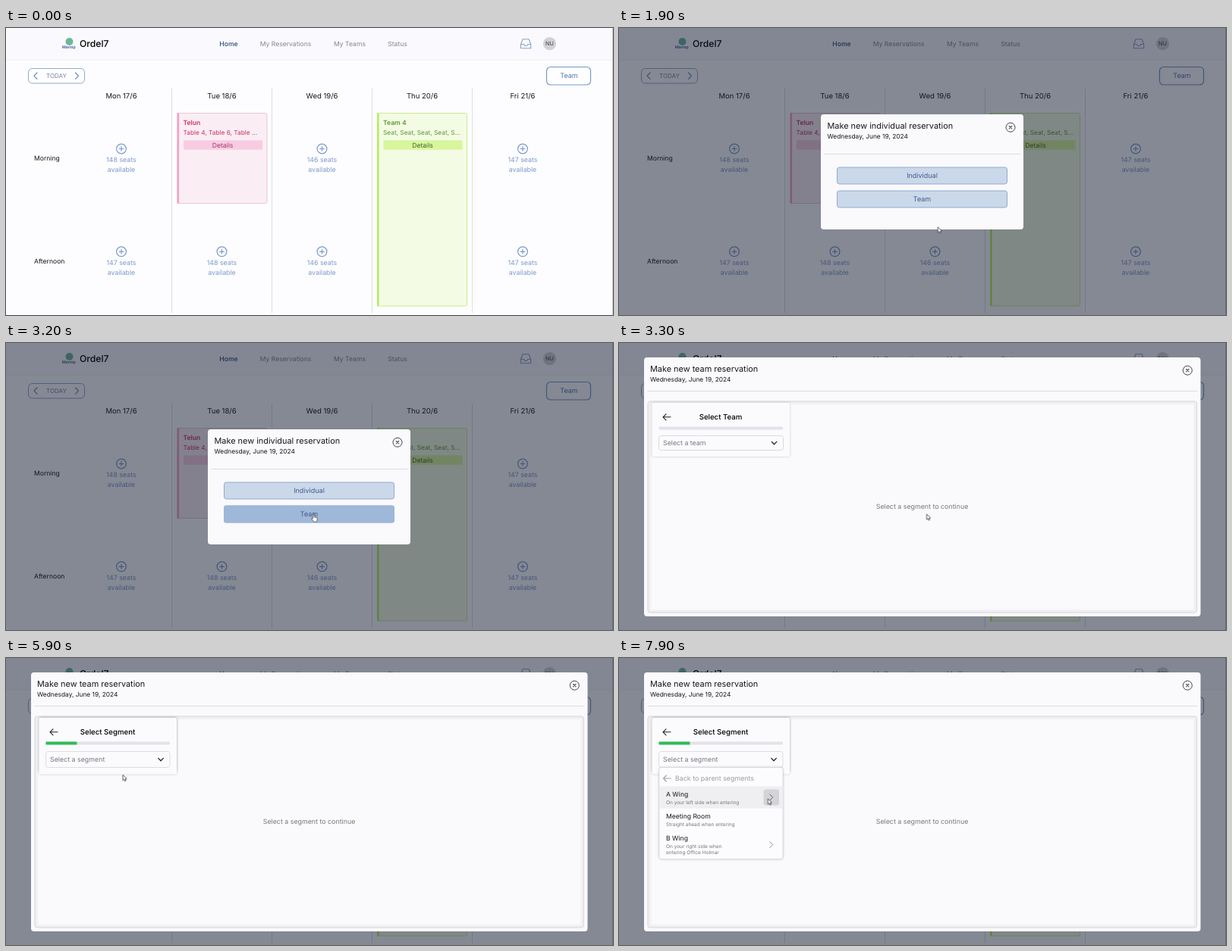
Animation, 800 px wide and 379 px high, one loop 8000 ms. Source, as an HTML page:

```html
<!DOCTYPE html>
<html lang="en">
<head>
<meta charset="utf-8">
<title>Seat reservations</title>
<style>
html, body { margin: 0; width: 100%; height: 100%; overflow: hidden; background: #fdfdff; }
svg { display: block; width: 800px; height: 379px; }
text { font: 8.6px Inter, "Open Sans", sans-serif; fill: #17171c; text-rendering: geometricPrecision; }
.mid { text-anchor: middle; }
.line { fill: none; stroke-linecap: round; stroke-linejoin: round; }
.nav { fill: #85868d; }
.nav.on { fill: #2f4a80; font-weight: 500; }
.brand { font-size: 12.2px; font-weight: 500; fill: #000; }
.day { font-size: 9.5px; }
.slot text { font-size: 8.8px; fill: #7d9acb; }
.slot .line { stroke: #7d9acb; }
.slot.over text { fill: #5f80ba; }
.slot.over .line { stroke: #3d5f9c; }
.title { font-size: 10.9px; }
.date { font-size: 8.35px; }
.btn { font-size: 9px; fill: #3c5a91; }
.step { font-size: 9.65px; font-weight: 500; fill: #000; }
.hint { font-size: 8.85px; fill: #77787f; }
.small { font-size: 6.5px; fill: #77787f; }
.soft { filter: drop-shadow(0 0 1.5px #0003); }

.a { animation: 8s linear infinite; }
.cell-over { animation-name: cell-over; }
.dim { animation-name: dim; }
.choice { animation-name: choice; }
.team-over { animation-name: team-over; }
.booking { animation-name: booking; }
.idle { animation-name: idle; }
.focus { animation-name: focus; }
.float { animation-name: float; }
.teams { animation-name: teams; }
.team-row { animation-name: team-row; }
.segment { animation-name: segment; }
.bar { animation-name: bar; transform-origin: 52.5px 0; }
.parents { animation-name: parents; }
.children { animation-name: children; }
.wing { animation-name: wing; }
.cursor { animation-name: move; animation-timing-function: ease-in-out; }
.hand { animation-name: hand; }
.arrow { animation-name: arrow; }

@keyframes cell-over { 0%, 6% { opacity: 0 } 8%, 23.12% { opacity: 1 } 23.13%, to { opacity: 0 } }
@keyframes dim { 0%, 23.12% { opacity: 0 } 23.13%, to { opacity: 1 } }
@keyframes choice { 0%, 23.12% { opacity: 0 } 23.13%, 40.62% { opacity: 1 } 40.63%, to { opacity: 0 } }
@keyframes team-over { 0%, 34% { opacity: 0 } 35.5%, to { opacity: 1 } }
@keyframes booking { 0%, 40.62% { opacity: 0 } 40.63%, to { opacity: 1 } }
@keyframes idle { 0%, 53.4% { opacity: 1 } 53.41%, to { opacity: 0 } }
@keyframes focus { 0%, 53.4% { opacity: 0 } 53.41%, to { opacity: 1 } }
@keyframes float {
  0%, 53.4% { transform: translate(58px, 135px) scale(1.24); fill: #77787f }
  54.7%, to { transform: translate(58px, 125px); fill: #4a6aa8 }
}
@keyframes teams { 0%, 55.6% { opacity: 0 } 56.8%, 70.62% { opacity: 1 } 70.63%, to { opacity: 0 } }
@keyframes team-row { 0%, 62% { opacity: 0 } 62.5%, to { opacity: 1 } }
@keyframes segment { 0%, 70.62% { opacity: 0 } 70.63%, to { opacity: 1 } }
@keyframes bar { 0%, 70.6% { transform: scaleX(0) } 73.4%, to { transform: none } }
@keyframes parents { 0%, 83% { opacity: 0 } 84%, 93.12% { opacity: 1 } 93.13%, to { opacity: 0 } }
@keyframes children { 0%, 93.12% { opacity: 0 } 93.13%, to { opacity: 1 } }
@keyframes wing { 0%, 95.6% { opacity: 0 } 96.5%, to { opacity: 1 } }
@keyframes move {
  0%, 5.5% { transform: translate(452px, 254px); opacity: 0 }
  5.6% { transform: translate(452px, 254px); opacity: 1 }
  11.2%, 30% { transform: translate(420.2px, 262.8px) }
  37.5%, 44% { transform: translate(405.5px, 225.8px) }
  53%, 57% { transform: translate(194.8px, 130.8px) }
  63%, 66% { transform: translate(157px, 157px) }
  68%, 77% { transform: translate(154px, 154.3px) }
  82%, 84.5% { transform: translate(185px, 131px) }
  90%, 93.5% { transform: translate(199px, 157px) }
  97.5%, to { transform: translate(196.3px, 185.8px); opacity: 1 }
}
@keyframes hand {
  0%, 23.12% { opacity: 1 } 23.13%, 34% { opacity: 0 }
  34.01%, 40.62% { opacity: 1 } 40.63%, 51% { opacity: 0 }
  51.01%, 70.62% { opacity: 1 } 70.63%, 80.5% { opacity: 0 }
  80.51%, 93.12% { opacity: 1 } 93.13%, to { opacity: 0 }
}
@keyframes arrow {
  0%, 23.12% { opacity: 0 } 23.13%, 34% { opacity: 1 }
  34.01%, 40.62% { opacity: 0 } 40.63%, 51% { opacity: 1 }
  51.01%, 70.62% { opacity: 0 } 70.63%, 80.5% { opacity: 1 }
  80.51%, 93.12% { opacity: 0 } 93.13%, to { opacity: 1 }
}
</style>
</head>
<body>
<svg id="stage" viewBox="0 0 800 379"></svg>
<script>
const text = (x, y, s, cls = '', style = '') =>
  `<text x="${x}" y="${y}" class="${cls}" style="${style}">${s}</text>`;
const mid = (x, y, s, cls = '', style = '') => text(x, y, s, 'mid ' + cls, style);
const box = (x, y, w, h, fill, r = 0, stroke = 'none', sw = 1, cls = '') =>
  `<rect x="${x}" y="${y}" width="${w}" height="${h}" rx="${r}" fill="${fill}" stroke="${stroke}" stroke-width="${sw}" class="${cls}"/>`;
const line = (d, color, w = 1) =>
  `<path d="${d}" class="line" stroke="${color}" stroke-width="${w}"/>`;
const anim = (name, ...parts) => `<g class="a ${name}">${parts.join('')}</g>`;
const back = (x, y, color) => line(`M${x + 10} ${y}H${x}m4-4l-4 4 4 4`, color, 1.1);
const right = (x, y, color) => line(`M${x - 2} ${y - 4}l4 4-4 4`, color);
const down = (x, y) => line(`M${x - 3.3} ${y - 1.6}l3.3 3.3 3.3-3.3`, '#222', 1.3);
const close = (x, y) => `<circle cx="${x}" cy="${y}" r="6" fill="none" stroke="#45464d"/>` +
  line(`M${x - 1.7} ${y - 1.7}l3.4 3.4m0-3.4l-3.4 3.4`, '#45464d', 1.1);

const slot = (x, y, seats, cls = '') => `<g class="slot ${cls}">
  <circle cx="${x}" cy="${y}" r="6.4" class="line" stroke-width="1.2"/>
  <path d="M${x - 2.8} ${y}h5.6m-2.8-2.8v5.6" class="line" stroke-width="1.2"/>
  ${mid(x, y + 17.6, seats + ' seats')}${mid(x, y + 30.2, 'available')}</g>`;

const card = (x, h, c, name, places) =>
  box(x + .5, 112.5, 118, h, c.fill, 2, c.edge) +
  box(x, 112, 2.6, h + 1, c.bar, 1) +
  text(x + 8, 128.3, name, '', `font-weight:600;fill:${c.text}`) +
  text(x + 8, 141, places, '', `font-size:8.3px;fill:${c.text}`) +
  box(x + 8.5, 148.3, 104, 12.4, c.chip) +
  mid(x + 60, 157.6, 'Details', '', `fill:${c.label}`);

const pink = { fill: '#faeef4', edge: '#ecc6cf', bar: '#f2a3c6', text: '#d02f68', chip: '#f7cce2', label: '#a63468' };
const green = { fill: '#f4fbe4', edge: '#c9ec92', bar: '#b4f05c', text: '#5a9a30', chip: '#d8f69b', label: '#44662a' };

const header = box(0, 0, 800, 42, '#faf9fd') + line('M0 42H800', '#ededf1') +
  '<circle cx="83.5" cy="18" r="5" fill="#6cb79c"/>' +
  text(74, 27.3, 'Marnip', '', 'font-size:5.2px;font-weight:600;fill:#34558f') +
  text(97, 25, 'Ordel7', 'brand') +
  mid(293.5, 24, 'Home', 'nav on') + mid(368.5, 24, 'My Reservations', 'nav') +
  mid(453, 24, 'My Teams', 'nav') + mid(516, 24, 'Status', 'nav') +
  line('M678.5 21.5l2.6-6.7h8l2.6 6.7v5.2h-13.2zh4l1.2 2h2.8l1.2-2h4', '#8ca3cc', 1.1) +
  '<circle cx="716.5" cy="20.7" r="8.6" fill="#d2d2d5"/>' +
  mid(716.5, 23.4, 'NU', '', 'font-size:7.3px;fill:#3f4046');

const toolbar = box(29.5, 53.5, 74, 19.5, '#fefeff', 5, '#90a9d0') +
  line('M41 59l-4 4.2 4 4.2M91.5 59l4 4.2-4 4.2', '#6484ba', 1.1) +
  mid(66.5, 66.2, 'TODAY', '', 'font-size:8px;fill:#7488ad') +
  box(712.5, 51.5, 58, 23.5, '#fefeff', 5, '#7698ca', 1.2) +
  mid(742, 66.4, 'Team', 'btn', 'fill:#4f74b1');

const cols = [152, 284.5, 416.5, 548.5, 681];
const days = ['Mon 17/6', 'Tue 18/6', 'Wed 19/6', 'Thu 20/6', 'Fri 21/6'];
const morning = [148, 0, 146, 0, 147];
const afternoon = [147, 148, 146, 0, 147];
const week = cols.map((x, i) =>
  mid(x, 93.2, days[i], 'day') +
  (i ? line(`M${86.5 + 132 * i} 80V376`, '#dedee2') : '') +
  (morning[i] ? slot(x, 159.5, morning[i]) : '') +
  (afternoon[i] ? slot(x, 295.3, afternoon[i]) : '')).join('') +
  text(37, 175.2, 'Morning') + text(37, 311, 'Afternoon') +
  card(225.5, 119, pink, 'Telun', 'Table 4, Table 6, Table ...') +
  card(489, 254.5, green, 'Team 4', 'Seat, Seat, Seat, Seat, S...') +
  anim('cell-over', box(357, 248, 119, 119, '#f2f2f4', 2), slot(416.5, 295.3, 146, 'over'));

const choice = anim('choice',
  box(266, 114, 267, 152, '#faf9fc', 4),
  text(274.5, 133.3, 'Make new individual reservation', 'title'),
  text(274.5, 146.2, 'Wednesday, June 19, 2024', 'date'),
  close(516, 131.2), line('M271 166.5H529', '#dcdce1'),
  box(287.5, 184, 224, 22, '#cbd8e9', 3, '#8fabd2'), mid(399.5, 198.2, 'Individual', 'btn'),
  box(287.5, 215, 224, 22, '#cbd8e9', 3, '#8fabd2'),
  anim('team-over', box(287, 214.5, 225, 23, '#9fb7d9', 3)),
  mid(399.5, 229.2, 'Team', 'btn'));

const panel = (h, title, track) =>
  box(43.5, 79, 181.5, h, '#fbfafd', 2, 'none', 0, 'soft') +
  back(58, 97.8, '#222') + mid(134, 101.2, title, 'step') +
  box(52.5, 110.4, 163.5, 4.2, track, 1.5);

const menu = (h) => box(53, 144.5, 163, h, '#fcfbfd', 3, '#d6d6dc', .7, 'soft');

const teamStep = panel(71, 'Select Team', '#e0e2ed') +
  anim('idle', box(52.5, 122.5, 164, 19, '#fbfafd', 3, '#d9d9e0')) +
  anim('focus', box(52.5, 122.8, 164, 18.6, '#fbfafd', 3, '#5878b4', 1.4), box(56, 121, 51, 4, '#fbfafd')) +
  `<text class="a float" style="font-size:7.1px">Select a team</text>` + down(204.5, 132) +
  anim('teams', menu(57),
    anim('team-row', box(53.4, 146, 162.2, 27, '#eeedf1')),
    text(62, 162.5, 'Telun'), text(62, 190.5, 'Team 4'));

const item = (y, name, ...notes) => text(62, y, name) +
  notes.map((s, i) => text(62, y + 9.4 + 8.6 * i, s, 'small')).join('');

const segmentStep = anim('segment',
  panel(74.5, 'Select Segment', '#e3e3e8'),
  `<rect x="52.5" y="110.4" width="41" height="4.2" rx="1.2" fill="#30bd56" class="a bar"/>`,
  box(52.5, 123.5, 163.5, 21, '#fbfafd', 3, '#dddde3'),
  text(58, 137, 'Select a segment', 'hint'), down(204, 134),
  anim('parents', menu(29), box(53.4, 146, 162.2, 26, '#eeedf1'),
    text(62, 162.3, 'Office Holmar'), right(200.7, 159.3, '#77787f')),
  anim('children', menu(121),
    back(58.5, 159, '#a2a2a9'), text(74, 162.2, 'Back to parent segments', 'hint', 'fill:#9c9ca3'),
    right(200.7, 184, '#77787f'),
    anim('wing', box(53.4, 169.5, 162.2, 29, '#efeef1'), box(190.5, 173.5, 20.5, 21, '#d3d3d8', 3),
      right(200.7, 184, '#666')),
    item(183.2, 'A Wing', 'On your left side when entering'),
    item(212.2, 'Meeting Room', 'Straight ahead when entering'),
    item(241.3, 'B Wing', 'On your right side when', 'entering Office Holmar'),
    right(200.7, 246.5, '#8d8d94')));

const booking = anim('booking',
  box(33, 19, 733.5, 342, '#faf9fc', 4),
  text(41, 38.3, 'Make new team reservation', 'title'),
  text(41, 51.3, 'Wednesday, June 19, 2024', 'date'),
  close(749.3, 36.2), line('M38 63.5H762', '#dcdce1'),
  [5, 3, 1].map(w => box(37.5 + w / 2, 76.5 + w / 2, 724.5 - w, 280 - w, 'none', 3, w > 1 ? '#00000006' : '#d9d9df', w)).join(''),
  mid(399.5, 219.2, 'Select a segment to continue', 'hint'),
  teamStep, segmentStep);

const cursor = anim('cursor',
  `<g fill="#fff" stroke="#33343a" stroke-width=".8" stroke-linejoin="round">
  <path class="a hand" d="M-1 1a1 1 0 0 1 2 0V4l3.1.6q1 .3.9 1.4L4.6 9q-.2 1.2-1.2 1.2H.6q-.7 0-1.2-.8L-2.8 6.2q.2-1 1.8-.2Z"/>
  <path class="a arrow" d="M0 0V7.4L1.7 5.9 2.8 8.4 4.1 7.8 3 5.5 5.2 5.2Z"/></g>`);

document.getElementById('stage').innerHTML =
  box(0, 0, 800, 379, '#fdfdff') + header + toolbar + week + line('M799.5 0V379', '#c4c4c9') +
  anim('dim', box(0, 0, 800, 379, 'rgba(15,23,42,.5)')) + choice + booking + cursor;
</script>
</body>
</html>
```
